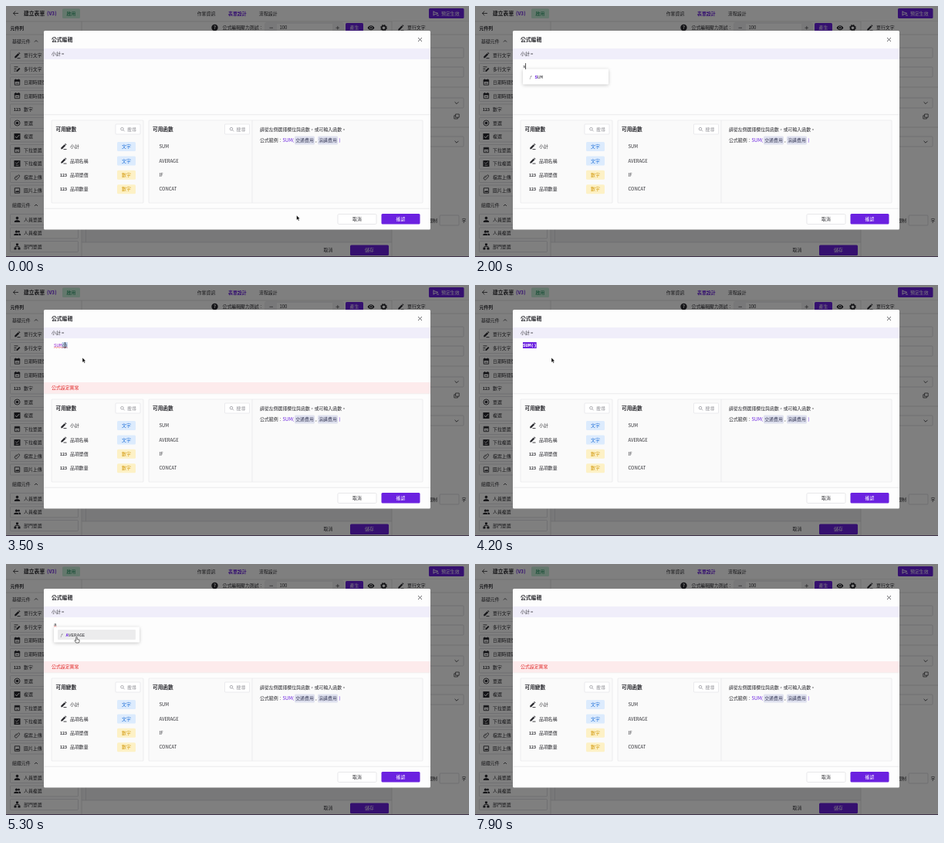
An HTML page that plays this animation: 600x325 px, repeating every 8 s.

```html
<!DOCTYPE html>
<html lang="zh-Hant">
<head>
<meta charset="utf-8">
<style>
html, body { margin: 0; width: 100%; height: 100%; overflow: hidden; }
svg { display: block; width: 600px; height: 325px; font-family: "Noto Sans CJK TC", "Noto Sans CJK SC", "Noto Sans", sans-serif; }
text { white-space: pre; }
.mono { font-family: "Liberation Mono", "DejaVu Sans Mono", monospace; }
</style>
</head>
<body>
<svg viewBox="0 0 600 325"><g id="page"></g><g id="live"></g></svg>
<script>
const PURPLE = '#6b21e0', INK = '#2b2b30', MUTED = '#8c8c92', LINE = '#e4e4e7';

const rect = (x, y, w, h, fill, stroke = 'none', r = 0) =>
  `<rect x="${x}" y="${y}" width="${w}" height="${h}" fill="${fill}" stroke="${stroke}" stroke-width=".6" rx="${r}"/>`;
const line = (d, color = INK, w = .8) =>
  `<path d="${d}" fill="none" stroke="${color}" stroke-width="${w}"/>`;
const shape = (d, fill = INK) => `<path d="${d}" fill="${fill}" fill-rule="evenodd"/>`;
const at = (x, y, body) => `<g transform="translate(${x} ${y})">${body}</g>`;
// cy is the vertical middle of the glyphs
const text = (x, cy, str, { size = 5.9, fill = INK, weight = 400, anchor = 'start', cls = '' } = {}) =>
  `<text x="${x}" y="${cy + size * .37}" font-size="${size}" fill="${fill}" font-weight="${weight}" text-anchor="${anchor}" class="${cls}">${str}</text>`;
const mid = { anchor: 'middle' }, bold = { weight: 700 };
const mono = (x, y, str, fill, weight = 400) =>
  text(x, y, str, { fill, weight, cls: 'mono' });

const box = line('M-3.2-3.2H3.2V3.2H-3.2Z', INK, .9);
const frame = shape('M-4-4H4V4H-4Z');
const icons = {
  pen: shape('M-3.2 1.6L1.2-2.8L2.8-1.2L-1.6 3.2H-3.2ZM1.7-3.3L2.5-4L4-2.5L3.3-1.7Z') + line('M0 3.6H4', INK, .9),
  lines: line('M-4-2.6H1M-4 0H-1M-4 2.6H-2', INK, .9) + shape('M-1 2L2.6-1.6L4-.2L.4 3.4H-1Z'),
  date: box + shape('M-3.6-3.6H3.6V-1H-3.6Z') + line('M-2-4.5V-3M2-4.5V-3M-1.6 1H1.6'),
  num: text(0, 0, '123', { size: 5.2, weight: 900, anchor: 'middle' }),
  radio: `<circle r="3.5" fill="none" stroke="${INK}" stroke-width=".9"/><circle r="1.8" fill="${INK}"/>`,
  check: frame + line('M-2.4 0L-.7 1.8L2.6-1.9', '#fff', 1),
  drop: box + shape('M-3-3H3V-.8H-3Z') + line('M-1.4 .8L0 2L1.4 .8'),
  drops: frame + line('M-2.4-1.4L-.7 .2L2.6-2.7M-2 2.2H2', '#fff', .8),
  clip: `<g transform="rotate(40)">${line('M-1.8-1V2.2A1.8 1.8 0 0 0 1.8 2.2V-2.4A1.2 1.2 0 0 0-.6-2.4V1.8', INK, .7)}</g>`,
  image: box + shape('M-2.4 2L-1 0L0 1.1L1.2-.6L2.6 2Z'),
  user: `<circle cy="-1.9" r="1.8" fill="${INK}"/>` + shape('M-3.6 3.4V2.3C-3.2 .1 3.2 .1 3.6 2.3V3.4Z'),
  users: `<circle cx="-1" cy="-1.8" r="1.6" fill="${INK}"/><circle cx="2" cy="-1.8" r="1.4" fill="${INK}"/>` +
    shape('M-4.2 3V2C-3.8 .2 1.4 .2 1.8 2V3ZM2.4 3H4.6V2C4.4 1 3.4 .6 2 .6Z'),
  group: shape('M-1.5-4H1.5V-1.2H-1.5ZM-4 1.2H-1V4H-4ZM1 1.2H4V4H1Z') + line('M0-1V0M-2.5 1.4V0H2.5V1.4'),
  up: line('M-2 1L0-1L2 1'),
  down: line('M-2.4-1.2L0 1.2L2.4-1.2'),
  find: `<circle cx="-.5" cy="-.5" r="1.8" fill="none" stroke="${MUTED}" stroke-width=".7"/>` + line('M.8 .8L2.6 2.6', MUTED, .7),
  eye: shape('M-4.5 0C-2.2-4 2.2-4 4.5 0C2.2 4-2.2 4-4.5 0Z') +
    '<circle r="2" fill="#fff"/>' + `<circle r="1.2" fill="${INK}"/>`,
  gear: `<circle r="2.7" fill="none" stroke="${INK}" stroke-width="1.7"/>` +
    `<circle r="3.9" fill="none" stroke="${INK}" stroke-width="1" stroke-dasharray="1.6 1.46"/>`,
  copy: line('M-1.4-3H3.2V1.2H-1.4ZM-1.4-1.2H-3.2V3H1.4V1.2', INK, .7)
};
const icon = (name, x, y) => at(x, y, icons[name]);

function sidebar() {
  const item = (name, label, y) =>
    rect(5.5, y - 7, 88, 14, '#fff', '#cfcfd4', 1) + icon(name, 14.5, y) + text(23, y, label);
  const fields = [['pen', '單行文字'], ['lines', '多行文字'], ['date', '日期時間單選'], ['date', '日期時間區間'],
    ['num', '數字'], ['radio', '單選'], ['check', '複選'], ['drop', '下拉單選'], ['drops', '下拉複選'],
    ['clip', '檔案上傳'], ['image', '圖片上傳']];
  const people = [['user', '人員單選'], ['users', '人員複選'], ['group', '部門單選']];
  return text(5.5, 28.5, '元件列', bold) + line('M0 37H98M98 20V325', '#d0d0d4', .6) +
    text(8, 45.5, '基礎元件') + icon('up', 39, 45.5) +
    fields.map(([n, l], i) => item(n, l, 64 + i * 17.5)).join('') +
    text(8, 258, '組織元件') + icon('up', 39, 258) +
    people.map(([n, l], i) => item(n, l, 276.5 + i * 17.5)).join('');
}

function header() {
  return line('M16 9.5H9.5M12.3 6.7L9.5 9.5L12.3 12.3') +
    text(23, 9.7, '建立表單', { size: 6.8, weight: 700 }) + text(53, 9.7, '(V3)', { size: 6.4, weight: 700, fill: PURPLE }) +
    rect(73, 3.5, 23, 12.5, '#c9f2dc', 'none', 1.5) + text(84.5, 9.7, '啟用', { ...mid, fill: '#138a55' }) +
    text(259.5, 9.7, '作業資訊', mid) + text(299.8, 9.7, '表單設計', { ...mid, ...bold, fill: PURPLE }) +
    text(339.8, 9.7, '流程設計', mid) +
    rect(548, 3, 45.5, 13, PURPLE, 'none', 1.5) +
    at(557, 9.5, line('M-3-2L3 0L-3 2M-3-3V3M1 2.5H4', '#fff', .9)) + text(564, 9.7, '預定生效', { fill: '#fff' }) +
    line('M0 20H600', '#d0d0d4', .6);
}

function toolbar() {
  return `<circle cx="270.5" cy="28" r="4.2" fill="${INK}"/>` + text(270.5, 28, '?', { size: 6, weight: 700, fill: '#fff', anchor: 'middle' }) +
    text(280.5, 28.3, '公式編輯壓力測試：') + rect(336, 22, 101, 12.5, '#fff', '#cfcfd4', 1) +
    rect(336, 22, 15, 12.5, '#f1f1f3') + rect(423, 22, 14, 12.5, '#f1f1f3') +
    line('M341.5 28.3H346M427.5 28.3H432M429.8 26V30.6', INK, .6) + text(354.5, 28.3, '100') +
    rect(440, 22, 23, 12.5, PURPLE, 'none', 1.5) + text(451.5, 28.3, '產生', { ...mid, fill: '#fff' }) +
    icon('eye', 473, 28.3) + icon('gear', 489.5, 28.3);
}

function settings() {
  const boxes = [54, 79, 119, 169].map(y => rect(506, y, 87, 13, '#fff', '#cfcfd4', 1)).join('');
  return rect(500, 20, 100, 305, '#fff') + line('M500 20V325M500 37H600M550 105H600M550 157H600', '#d0d0d4', .6) +
    icon('pen', 511.5, 28.3) + text(520, 28.3, '單行文字') + boxes +
    icon('down', 584, 125.5) + icon('copy', 584, 143) + icon('down', 584, 176) +
    text(559, 277.5, '字數限制', { anchor: 'end' }) + rect(562, 271, 25, 13, '#fff', '#cfcfd4', 1) + text(590.5, 277.5, '字');
}

function search(x) {
  return rect(x, 153, 32, 13, '#fff', '#dedee2', 1) + icon('find', x + 9, 159.7) + text(x + 15, 159.7, '搜尋', { fill: MUTED });
}

function dialog() {
  const vars = [['pen', '小計', 0], ['pen', '品項名稱', 0], ['num', '品項單價', 1], ['num', '品項數量', 1]];
  const rowY = i => 182 + i * 18.4;
  const tag = (y, isNum) => rect(144, y - 6, 24, 12, isNum ? '#fdf1c6' : '#dcebfd', 'none', 1.5) +
    text(156, y, isNum ? '數字' : '文字', { ...mid, fill: isNum ? '#d39a10' : '#2472d8' });
  const pill = (x, label) => rect(x, 168.5, 26, 11, '#dfe1ef', 'none', 1.5) + text(x + 13, 174.2, label, { ...mid, fill: '#3c3f5c' });
  return rect(49, 32, 501, 257.5, '#fdfdfd', 'none', 1.5) +
    text(59, 43.5, '公式編輯', { size: 6.8, weight: 700 }) + line('M534 41L539 46M539 41L534 46', INK, .7) +
    rect(49, 55, 501, 14, '#f0eefa') + text(59, 62, '小計 =') +
    line('M49 140.7H550M49 262.3H550', LINE, .7) +
    rect(59, 148, 119, 107, '#fafafa', LINE, 1) + rect(185, 148, 355, 107, '#fafafa', LINE, 1) +
    line('M319 148V255', LINE, .6) +
    text(64.5, 160, '可用變數', { size: 6.7, weight: 700 }) + search(142) +
    text(190, 160, '可用函數', { size: 6.7, weight: 700 }) + search(283.5) +
    vars.map(([n, l, k], i) => icon(n, 74.5, rowY(i)) + text(83, rowY(i), l) + tag(rowY(i), k)).join('') +
    ['SUM', 'AVERAGE', 'IF', 'CONCAT'].map((f, i) => text(198.5, rowY(i), f)).join('') +
    text(329, 160, '請從左側選擇欄位與函數，或可輸入函數。') +
    text(329, 174.2, '公式範例：') + text(358.5, 174.2, 'SUM(', { fill: PURPLE }) +
    pill(374, '交通費用') + text(401, 174.2, ',') + pill(404, '演講費用') + text(431.5, 174.2, ')', { fill: PURPLE }) +
    rect(430, 269.5, 50, 13, '#fff', '#d9d9de', 1.5) + text(455, 276, '取消', mid) +
    rect(486.5, 269, 50, 13.5, PURPLE, 'none', 1.5) + text(511.5, 276, '確認', { ...mid, fill: '#fff', weight: 500 });
}

page.innerHTML = rect(0, 0, 600, 325, '#fff') + rect(98, 37, 402, 269, '#f2f2f4') +
  header() + sidebar() + toolbar() +
  line('M98 306H500M103.5 289V306', '#d0d0d4', .6) + text(417.5, 316, '取消', mid) +
  rect(446, 309.5, 50, 13.5, PURPLE, 'none', 1.5) + text(471, 316, '儲存', { ...mid, fill: '#fff' }) +
  settings() + rect(0, 0, 600, 325, 'rgba(0,0,0,.5)') + rect(0, 324, 600, 1, '#3d3148') + dialog();

const LOOP = 8000, CHAR = 3.54, LEFT = 62;
// start time, editor text, suggestion, selected
const steps = [
  [0, ''], [200, ''], [1000, 's', 'SUM'], [3100, 'SUM()'], [4100, 'SUM()', '', true], [4300, ''],
  [4600, 'a', 'AVERAGE'], [5600, 'AVERAGE()'], [5900, 'AVERAGE()', '', true], [6050, ''],
  [6200, 'i', 'IF'], [6900, 'IF()'], [7200, 'IF()', '', true], [7400, '']
];
// time, x, y of the pointer
const path = [[0, 376.5, 271], [100, 376.5, 271], [300, 474, 104], [2300, 474, 104], [2900, 99, 94],
  [5000, 99, 94], [5250, 91.5, 95], [8000, 91.5, 95]];
const within = (t, spans) => spans.some(([a, b]) => t >= a && t < b);
const shown = [[0, 1000], [2300, 4300], [5000, 5900], [6700, 7400]];
const errors = [[2600, 3950], [5000, LOOP]];

function pointerAt(t) {
  const i = path.findIndex(p => p[0] > t), [t0, x0, y0] = path[i - 1], [t1, x1, y1] = path[i];
  const k = (t - t0) / (t1 - t0), e = k * k * (3 - 2 * k);
  return [x0 + (x1 - x0) * e, y0 + (y1 - y0) * e];
}

const arrow = '<path d="M0 0V6.3L1.5 5L2.5 7.3L3.6 6.8L2.6 4.6H4.5Z" fill="#000" stroke="#fff" stroke-width=".5"/>';
const hand = '<path d="M-.7 0Q0-.8 .7 0V2.5L3.6 3.2V5.3L2.8 7H-.8L-2.7 4.2L-2.1 3.5L-.7 4.4Z" fill="#fff" stroke="#111" stroke-width=".6"/>';

function editor(str, selected, error) {
  const w = str.length * CHAR, call = str.endsWith('()'), name = call ? str.slice(0, -2) : str;
  if (selected) return rect(LEFT, 74, w, 8, PURPLE) + mono(LEFT, 78, str, '#fff', 700);
  const bx = LEFT + name.length * CHAR;
  let out = call ? rect(bx, 74, CHAR * 2, 8, '#b9cbe6') : '';
  out += mono(LEFT, 78, name, call ? '#9a35d6' : INK) + (call ? mono(bx, 78, '()', '#3a4560') : '');
  if (error && str) {
    const n = Math.round(w / 1.75);
    out += line(`M${LEFT} 81.3` + Array.from({ length: n }, (_, i) => `l1.75 ${i % 2 ? .8 : -.8}`).join(''), '#e8403a', .6);
  }
  return out;
}

function popup(name, hover) {
  return '<g style="filter:drop-shadow(0 1px 2px rgba(0,0,0,.22))">' + rect(62, 81.5, 111, 20, '#fff', 'none', 1) + '</g>' +
    (hover ? rect(67, 85, 101, 13, '#ececed', 'none', 1) : '') +
    `<g font-style="italic">${mono(70.5, 91.5, 'ƒ', '#77777c')}</g>` +
    mono(77.5, 91.5, name[0], PURPLE, 700) + mono(77.5 + CHAR, 91.5, name.slice(1), INK);
}

function draw(now) {
  const t = now % LOOP;
  const [start, str, hint, selected] = steps.filter(s => s[0] <= t).pop();
  const error = within(t, errors), [x, y] = pointerAt(t);
  const hover = hint && x < 168;
  let out = error ? rect(49, 126, 501, 14.5, '#fdebec') + text(59, 133.3, '公式設定異常', { fill: '#e02b2b' }) : '';
  out += editor(str, selected, error);
  if (hint) out += popup(hint, hover);
  const blink = (t - start) % 1000 < 500;
  if (t >= 200 && !selected && blink) {
    const inside = str.endsWith('()') ? 1 : 0;
    out += rect(LEFT + (str.length - inside) * CHAR - .2, 74, .7, 8, '#111');
  }
  if (within(t, shown)) out += at(x, y, hover ? hand : arrow);
  live.innerHTML = out;
}

const begin = performance.now();
function tick() {
  draw(performance.now() - begin);
  requestAnimationFrame(tick);
}
tick();
</script>
</body>
</html>
```
